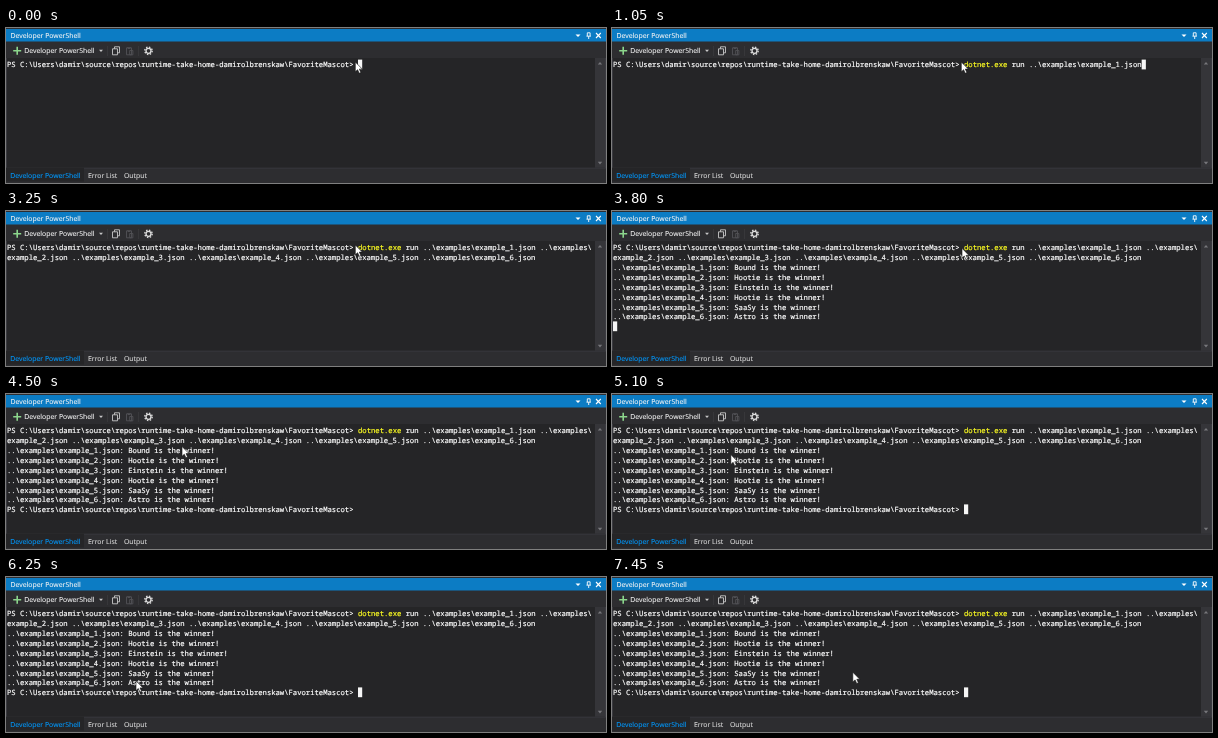
Write an HTML page that moves like this. It is 600 px wide and 155 px high and loops after 7500 ms.

```html
<!DOCTYPE html>
<html lang="en">
<head>
<meta charset="utf-8">
<title>Developer PowerShell</title>
<style>
  html, body { margin: 0; width: 100%; height: 100%; overflow: hidden; background: #2d2d30; }
  svg { display: block; width: 600px; height: 155px; }
  text { white-space: pre; text-rendering: geometricPrecision; }
  .ui { font: 6.9px "Open Sans", "Noto Sans", sans-serif; fill: #f4f4f4; stroke: #f4f4f4; stroke-width: .12; }
  .tab { fill: #d8d8d8; stroke: #d8d8d8; }
  .active { fill: #0097fb; stroke: #0097fb; }
  .term { font: 7.222px "Noto Sans Mono", "DejaVu Sans Mono", monospace; fill: #fff; stroke: #fff; stroke-width: .2; }
  .cmd { fill: #ff2; stroke: #ff2; }
</style>
</head>
<body>
<svg viewBox="0 0 600 155">
  <rect width="600" height="155" fill="#2d2d30"/>

  <!-- title bar -->
  <rect y="1" width="600" height="12.5" fill="#0c7cc4"/>
  <text class="ui" x="4.5" y="10">Developer PowerShell</text>
  <g fill="none" stroke="#fff" stroke-width=".9">
    <path d="M569.5 6.5h5l-2.5 2.6z" fill="#fff" stroke="none"/>
    <path d="M580.5 8.2h4.4M581.3 8V4.8h2.8V8M582.7 8.3v2.7"/>
    <path d="M590 5l4.8 5M594.8 5l-4.8 5" stroke-width="1.1"/>
  </g>

  <!-- toolbar -->
  <path d="M11.2 18.7v8M7.2 22.7h8" stroke="#8cd68c" stroke-width="1.6"/>
  <text class="ui" x="18.3" y="25.2">Developer PowerShell</text>
  <path d="M93 21.7h4l-2 2.2z" fill="#c8c8c8"/>
  <path d="M101.5 18v10M132.5 18v10" stroke="#3a3a3e" stroke-width=".8"/>
  <g fill="#2d2d30" stroke="#c8c8c8" stroke-width=".9">
    <path d="M108.5 18.8h5v6h-5z"/>
    <path d="M106.5 20.8h5v6h-5z"/>
  </g>
  <path d="M120.5 19.8h5v7h-5zM122 19v1.5h2V19M123.7 22.5h3.2v4.3h-3.2z" fill="none" stroke="#525256" stroke-width=".9"/>
  <g fill="none" stroke="#dedede">
    <circle cx="142.5" cy="22.8" r="2.5" stroke-width="1.3"/>
    <circle cx="142.5" cy="22.8" r="3.7" stroke-width="1.4" stroke-dasharray="1.45 1.456"/>
  </g>

  <!-- terminal -->
  <rect y="30" width="600" height="110.5" fill="#3a3a40"/>
  <rect x="1" y="30" width="598" height="109.7" fill="#252527"/>
  <rect x="589" y="30" width="10" height="109.7" fill="#353539"/>
  <path d="M591.8 36.5h4.4l-2.2-2.6zM591.8 133.8h4.4l-2.2 2.6z" fill="#77777b"/>
  <g id="term" class="term"></g>
  <rect id="caret" width="4.2" height="9.8" fill="#f6f6f6"/>

  <!-- tabs -->
  <rect y="139.7" width="78" height="13.8" fill="#252527"/>
  <text class="ui active" x="4.3" y="150">Developer PowerShell</text>
  <text class="ui tab" x="82" y="150">Error List</text>
  <text class="ui tab" x="118" y="150">Output</text>

  <path id="mouse" d="M0 0V9.8L2.3 7.7L3.9 11.3L5.6 10.5L4 7.1H7Z" fill="#fff" stroke="#111" stroke-width=".6"/>
</svg>
<script>
const LOOP = 7500, TICK = 50;
const CELL = 4.3333, LINE = 9.85, LEFT = 1, TOP = 31.6, BASE = 39.4, WIDTH = 135;
const PROMPT = 'PS C:\\Users\\damir\\source\\repos\\runtime-take-home-damirolbrenskaw\\FavoriteMascot> ';
const EXE = 'dotnet.exe';
const winners = ['Bound', 'Hootie', 'Einstein', 'Hootie', 'SaaSy', 'Astro'];
const files = winners.map((_, i) => `..\\examples\\example_${i + 1}.json`);
const command = `${EXE} run ${files.join(' ')}`;
const wrap = WIDTH - PROMPT.length;
const LAST = 2 + winners.length;

const TYPE = 600, PASTE = 1050, ENTER = 1750, OUTPUT = 3750, DONE = 3850;
const BLINK = 533, BLINK_START = 17;

// key points of the pointer tip: time, x, y
const path = [
  [OUTPUT, 349.3, 34], [3800, 350, 37.3], [4050, 350, 37.3], [4500, 176, 52.5], [4850, 128, 58],
  [5600, 100.5, 65.8], [5700, 98.5, 76], [6250, 130, 103.8], [6500, 195.5, 104], [6700, 240.8, 95.2]
];

const $ = id => document.getElementById(id);
const clamp = (v, lo, hi) => Math.max(lo, Math.min(hi, v));
const show = (el, on) => el.setAttribute('visibility', on ? 'visible' : 'hidden');

function addText(row, col, content = '', cls = '') {
  const el = document.createElementNS('http://www.w3.org/2000/svg', 'text');
  el.setAttribute('x', LEFT + col * CELL);
  el.setAttribute('y', BASE + row * LINE);
  el.setAttribute('class', cls);
  el.textContent = content;
  return $('term').appendChild(el);
}

addText(0, 0, PROMPT);
const input = [
  { el: addText(0, PROMPT.length, '', 'cmd'), from: 0, to: EXE.length },
  { el: addText(0, PROMPT.length + EXE.length), from: EXE.length, to: wrap },
  { el: addText(1, 0), from: wrap, to: command.length }
];
const output = winners.map((name, i) => addText(2 + i, 0, `${files[i]}: ${name} is the winner!`));
const nextPrompt = addText(LAST, 0, PROMPT);

// a few keystrokes, then the rest arrives in quick chunks
function typedCount(t) {
  if (t < PASTE) return clamp((t - TYPE) / TICK + 1, 0, 5);
  return Math.min(command.length, 41 + (t - PASTE) / TICK * 54);
}

function caretCell(t, typed) {
  if (t >= DONE) return [LAST, PROMPT.length];
  if (t >= OUTPUT) return [LAST, 0];
  if (t >= ENTER) return [2, 0];
  const pos = PROMPT.length + typed;
  return [Math.floor(pos / WIDTH), pos % WIDTH];
}

function pointer(t) {
  const i = clamp(path.findIndex(p => p[0] > t), 1, path.length - 1);
  const [a, b] = t < path.at(-1)[0] ? [path[i - 1], path[i]] : path.slice(-2);
  const k = clamp((t - a[0]) / (b[0] - a[0]), 0, 1);
  return [a[1] + (b[1] - a[1]) * k, a[2] + (b[2] - a[2]) * k];
}

function draw(t) {
  const typed = typedCount(t);
  input.forEach(({ el, from, to }) => el.textContent = command.slice(from, clamp(typed, from, to)));
  output.forEach(el => show(el, t >= OUTPUT));
  show(nextPrompt, t >= DONE);

  const [row, col] = caretCell(t, typed);
  $('caret').setAttribute('x', LEFT + col * CELL);
  $('caret').setAttribute('y', TOP + row * LINE);
  show($('caret'), Math.floor((t - BLINK_START) / BLINK) % 2 !== 0);
  $('mouse').setAttribute('transform', `translate(${pointer(t)})`);
}

const start = performance.now();
function frame() {
  const t = (performance.now() - start) % LOOP;
  draw(Math.floor(t / TICK) * TICK);
  requestAnimationFrame(frame);
}
frame();
</script>
</body>
</html>
```
